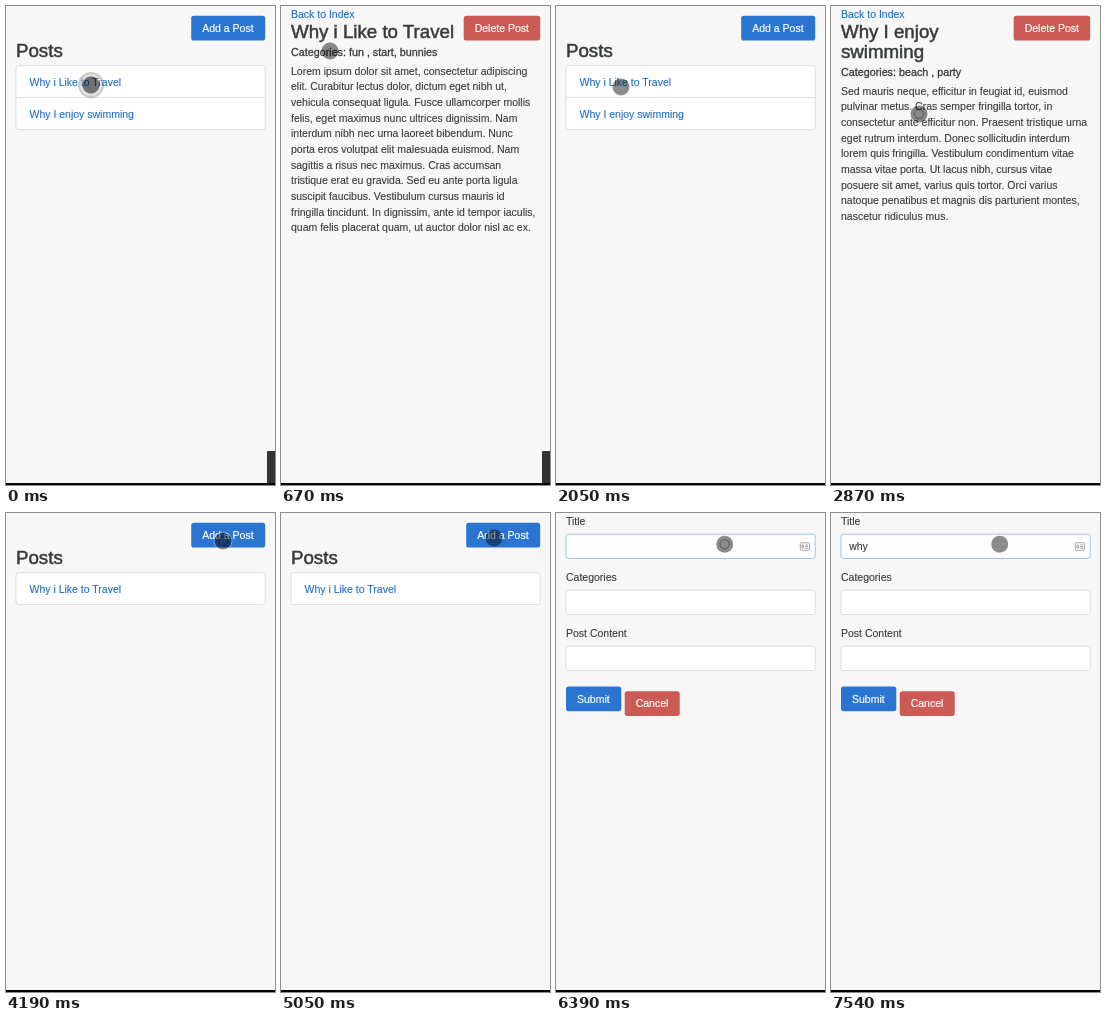
An HTML page for the animation above (8000 ms loop, 269 by 479 pixels).

```html
<!DOCTYPE html>
<html lang="en">
<head>
<meta charset="utf-8">
<title>Posts</title>
<style>
  html, body { margin: 0; width: 100%; height: 100%; overflow: hidden; background: #f7f7f7; }
  svg { display: block; width: 100vw; height: 100vh; }
  text { font: 10.5px "Liberation Sans", Arial, sans-serif; fill: #373a3c; stroke: #373a3c; stroke-width: .12px; white-space: pre; }
  .link { fill: #1f6fc8; stroke: #1f6fc8; }
  .title { font-size: 18.7px; stroke-width: .5px; }
  .strong { font-size: 10.75px; stroke-width: .3px; }
  .label { fill: #fff; stroke: #fff; stroke-width: .2px; }
  .box { fill: #fff; stroke: #d6d6d6; stroke-width: .8px; }
  .focus { stroke: #86b7e8; }
</style>
</head>
<body>
<svg viewBox="0 0 269 479" preserveAspectRatio="none">
  <rect width="269" height="479" fill="#f7f7f7"/>
  <g id="page"></g>
  <rect id="tab" x="261" y="445" width="10" height="33" rx="1" fill="#343434"/>
  <rect y="477" width="269" height="2" fill="#050305"/>
  <g id="cursor">
    <circle id="halo" r="13" fill="#000" fill-opacity=".2"/>
    <circle id="ring" r="10" fill="none" stroke="#fff" stroke-opacity=".5" stroke-width="1.6"/>
    <circle id="disc" r="8.5" fill="#000" fill-opacity=".45"/>
    <circle id="core" r="4.5" fill="none" stroke="#000" stroke-opacity=".25" stroke-width="1.5"/>
  </g>
</svg>
<script>
const LOOP = 8000;
const BLUE = "#2b75d2", RED = "#cb5b54";
const $ = id => document.getElementById(id);

const text = (x, y, s, cls = "") => `<text x="${x}" y="${y}" class="${cls}">${s}</text>`;
const box = (y, h, cls = "") =>
  `<rect x="10" y="${y}" width="249.2" height="${h}" rx="2.5" class="box ${cls}"/>`;
const button = (x, y, w, label, color) =>
  `<rect x="${x}" y="${y}" width="${w}" height="24.7" rx="2.6" fill="${color}"/>` +
  text(x + 11, y + 16.2, label, "label");
const lines = (x, y, step, rows, cls) =>
  rows.map((row, i) => text(x, y + i * step, row, cls)).join("");

function indexPage(posts) {
  return button(185.2, 9.8, 74, "Add a Post", BLUE) + text(10, 51, "Posts", "title") +
    box(59.6, posts.length * 32) +
    posts.map((post, i) =>
      (i ? `<path d="M10 ${59.6 + i * 32}h249.2" class="box"/>` : "") +
      text(23.5, 79.5 + i * 32, post, "link")).join("");
}

function postPage(title, categories, body) {
  const shift = (title.length - 1) * 20;
  return text(10, 12, "Back to Index", "link") + button(182.7, 9.8, 76.5, "Delete Post", RED) +
    lines(10, 32, 20, title, "title") +
    text(10, 50.3 + shift, "Categories: " + categories, "strong") +
    lines(10, 68.8 + shift, 15.65, body);
}

function formPage(t) {
  const typed = t < 7000 ? "" : t < 7260 ? "wh" : "why";
  const fields = ["Title", "Categories", "Post Content"].map((name, i) =>
    text(10, 12 + i * 56, name) + box(21.2 + i * 56, 24.3, !i && t >= 6390 ? "focus" : ""));
  const icon = `<g fill="none" stroke="#999" stroke-width=".9">
    <rect x="244.3" y="29.8" width="9.2" height="7.4" rx=".8"/>
    <path d="M249.2 32h2.8M249.2 33.6h2.8M249.2 35.2h2.8M246 32h1.6v3h-1.6z"/></g>`;
  const caret = t >= 7410 && t < 7540 ? `<path d="M38.6 27.5v11" stroke="#444" stroke-width=".8"/>` : "";
  return fields.join("") + text(18.2, 37.2, typed) + caret + (t >= 6230 ? icon : "") +
    button(10, 173.5, 55.3, "Submit", BLUE) + button(68.7, 178.2, 55, "Cancel", RED);
}

const travelTitle = "Why i Like to Travel";
const travel = postPage([travelTitle], "fun , start, bunnies", [
  "Lorem ipsum dolor sit amet, consectetur adipiscing",
  "elit. Curabitur lectus dolor, dictum eget nibh ut,",
  "vehicula consequat ligula. Fusce ullamcorper mollis",
  "felis, eget maximus nunc ultrices dignissim. Nam",
  "interdum nibh nec urna laoreet bibendum. Nunc",
  "porta eros volutpat elit malesuada euismod. Nam",
  "sagittis a risus nec maximus. Cras accumsan",
  "tristique erat eu gravida. Sed eu ante porta ligula",
  "suscipit faucibus. Vestibulum cursus mauris id",
  "fringilla tincidunt. In dignissim, ante id tempor iaculis,",
  "quam felis placerat quam, ut auctor dolor nisl ac ex."]);
const swimming = postPage(["Why I enjoy", "swimming"], "beach , party", [
  "Sed mauris neque, efficitur in feugiat id, euismod",
  "pulvinar metus. Cras semper fringilla tortor, in",
  "consectetur ante efficitur non. Praesent tristique urna",
  "eget rutrum interdum. Donec sollicitudin interdum",
  "lorem quis fringilla. Vestibulum condimentum vitae",
  "massa vitae porta. Ut lacus nibh, cursus vitae",
  "posuere sit amet, varius quis tortor. Orci varius",
  "natoque penatibus et magnis dis parturient montes,",
  "nascetur ridiculus mus."]);
const bothPosts = indexPage([travelTitle, "Why I enjoy swimming"]);
const onePost = indexPage([travelTitle]);

// Each page with the time it opens
const pages = [
  [0, () => bothPosts], [260, () => travel], [1640, () => bothPosts],
  [2870, () => swimming], [4190, () => onePost], [5360, formPage]
];

// Pointer poses, held until the next one: time, x, y, state
const FREE = 0, DOWN = 1, RING = 2;
const poses = [
  [0, 85, 79, RING], [260, 85, 79, DOWN], [670, 49, 45, FREE],
  [820, 49, 34, FREE], [950, 49, 24, FREE], [1080, 49, 16, FREE], [1330, 49, 12, FREE],
  [1480, 49, 12, RING], [1640, 49, 12, DOWN], [1770, 49, 14, FREE], [1900, 50, 20, FREE],
  [2050, 65, 81, FREE], [2180, 82, 100, FREE], [2310, 89, 108, FREE],
  [2520, 88, 108, DOWN], [2720, 88, 108, RING], [2870, 88, 108, DOWN],
  [3000, 174, 79, FREE], [3140, 200, 50, FREE], [3270, 215, 31, FREE], [3400, 218, 28, FREE],
  [3530, 218, 28, RING], [4190, 217, 28, DOWN],
  [4390, 80, 11, FREE], [4540, 46, 40, FREE], [4670, 60, 64, FREE], [4800, 140, 50, FREE],
  [4920, 200, 30, FREE], [5050, 213, 25, FREE], [5190, 212.5, 24.5, RING],
  [5360, 211, 32, FREE], [5500, 190, 52, FREE], [5620, 171.5, 66, FREE],
  [5780, 167, 39, FREE], [5930, 170, 31, FREE], [6050, 169, 31, FREE],
  [6230, 168.7, 31.3, RING], [6390, 168.7, 31.3, DOWN], [6520, 168.7, 31.3, FREE]
];

const current = (list, t) => list.findLast(item => item[0] <= t);
const show = (id, visible) => $(id).setAttribute("visibility", visible ? "visible" : "hidden");
let shown = "";

function render(t) {
  const markup = current(pages, t)[1](t);
  if (markup !== shown) $("page").innerHTML = shown = markup;

  const [, x, y, state] = current(poses, t);
  $("cursor").setAttribute("transform", `translate(${x} ${y})`);
  show("halo", state === RING);
  show("ring", state !== FREE);
  $("ring").setAttribute("r", state === RING ? 10 : 9);
  $("ring").setAttribute("stroke-width", state === RING ? 1.6 : .8);
  show("core", state === DOWN);

  show("tab", t < 1480);
  $("tab").setAttribute("x", t < 820 ? 261 : 266);
}

const start = performance.now();
function frame() {
  render((performance.now() - start) % LOOP);
  requestAnimationFrame(frame);
}
frame();
</script>
</body>
</html>
```
